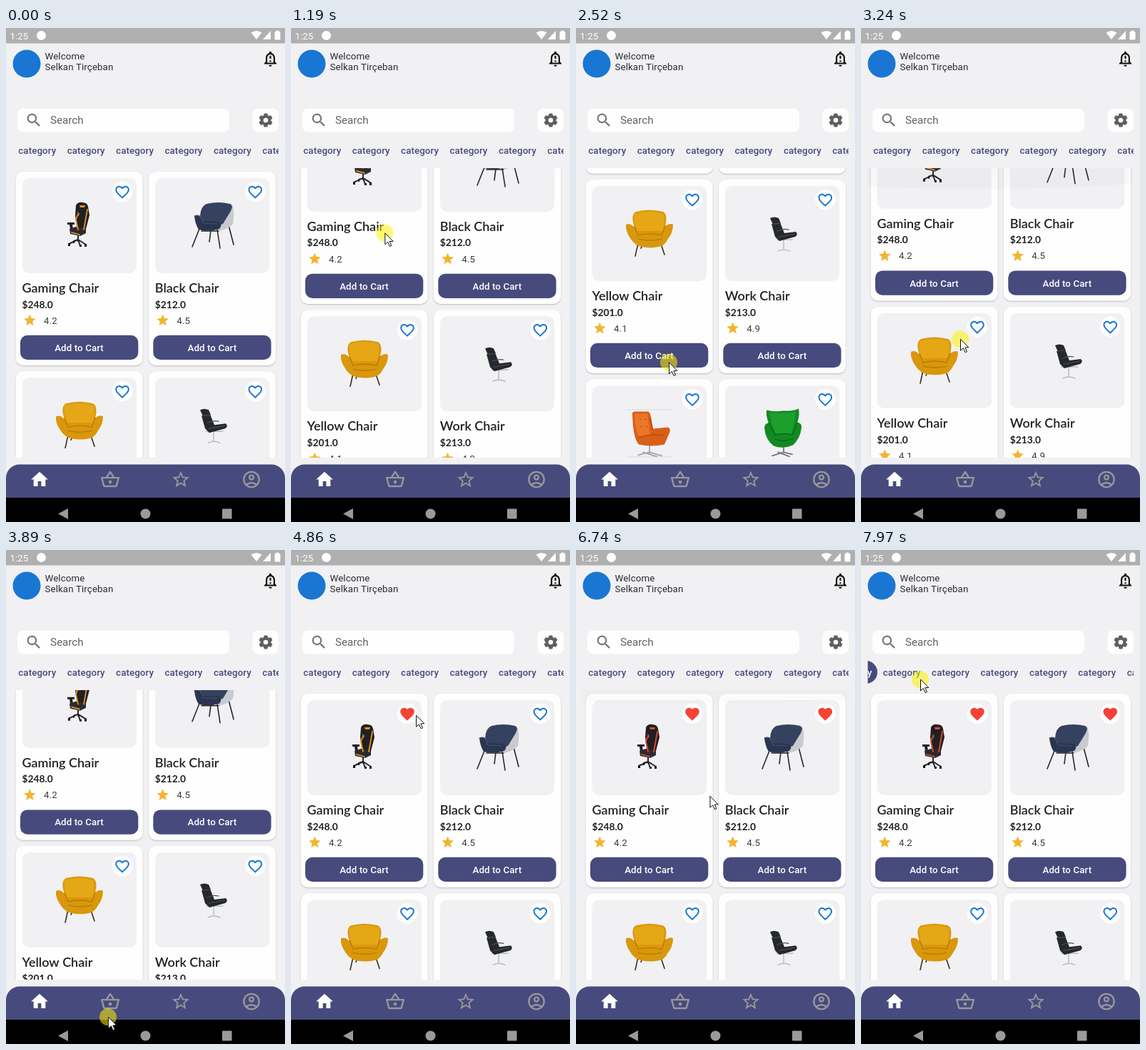
An HTML page with a canvas for the animation above (8000 ms loop, 391 by 691 pixels).

```html
<!DOCTYPE html>
<html lang="en">
<head>
<meta charset="utf-8">
<title>Chair shop</title>
<style>
html, body { margin: 0; width: 100%; height: 100%; overflow: hidden; background: #f1f1f3; }
canvas { display: block; width: 391px; height: 691px; }
</style>
</head>
<body>
<canvas id="stage"></canvas>
<script>
const W = 391, H = 691, LOOP = 8000;
const BG = '#f1f1f3', INDIGO = '#474a7c', WHITE = '#fefefe', BLUE = '#1976d2', RED = '#f44336';
const ROBOTO = 'Roboto, sans-serif', LATO = 'Lato, sans-serif';
const canvas = document.getElementById('stage');
const ctx = canvas.getContext('2d');
const dpr = window.devicePixelRatio || 1;
canvas.width = W * dpr;
canvas.height = H * dpr;

// 24-unit icons
const HEART = 'M12 21.35l-1.45-1.32C5.4 15.36 2 12.28 2 8.5 2 5.42 4.42 3 7.5 3c1.74 0 3.41.81 4.5 2.09C13.09 3.81 14.76 3 16.5 3 19.58 3 22 5.42 22 8.5c0 3.78-3.4 6.86-8.55 11.54z';
const ICONS = {
  home: 'M10 20v-6h4v6h5v-8h3L12 3 2 12h3v8z',
  basket: 'M22 9h-4.79l-4.38-6.56c-.4-.56-1.26-.56-1.66 0L6.79 9H2c-.55 0-1 .45-1 1l2.58 9.54C3.8 20.4 4.58 21 5.5 21h13c.92 0 1.69-.62 1.93-1.46L23 10c0-.55-.45-1-1-1zM12 4.8L14.8 9H9.2zM18.5 19h-13L3.3 11h17.4zM12 13a2 2 0 1 0 0 4 2 2 0 1 0 0-4z',
  starLine: 'M22 9.24l-7.19-.62L12 2 9.19 8.63 2 9.24l5.46 4.73L5.82 21 12 17.27 18.18 21l-1.63-7.03zM12 15.4l-3.76 2.27 1-4.28-3.32-2.88 4.38-.38L12 6.1l1.71 4.04 4.38.38-3.32 2.88 1 4.28z',
  star: 'M12 17.27L18.18 21l-1.64-7.03L22 9.24l-7.19-.61L12 2 9.19 8.63 2 9.24l5.46 4.73L5.82 21z',
  account: 'M12 2a10 10 0 1 0 0 20 10 10 0 1 0 0-20zM7.35 18.5C8.66 17.56 10.26 17 12 17s3.34.56 4.65 1.5a8 8 0 0 1-9.3 0zM18.14 17.12C16.45 15.8 14.32 15 12 15s-4.45.8-6.14 2.12A8 8 0 1 1 18.14 17.12zM12 6a3.5 3.5 0 1 0 0 7 3.5 3.5 0 1 0 0-7zM12 8a1.5 1.5 0 1 1 0 3 1.5 1.5 0 1 1 0-3z',
  search: 'M15.5 14h-.79l-.28-.27A6.5 6.5 0 1 0 13.73 14.43l.27.28v.79l5 4.99L20.49 19zM9.5 14a4.5 4.5 0 1 1 0-9 4.5 4.5 0 1 1 0 9z',
  bell: 'M18 16v-5c0-3.07-1.63-5.64-4.5-6.32V4c0-2-3-2-3 0v.68C7.64 5.36 6 7.92 6 11v5l-2 2v1h16v-1zM16 17H8v-6c0-2.48 1.51-4.5 4-4.5s4 2.02 4 4.5zM11 8h2v4h-2zM11 14h2v2h-2zM12 22a2 2 0 0 0 2-2h-4a2 2 0 0 0 2 2z',
  heart: HEART,
  heartLine: HEART + 'M12 18.65C7.14 14.24 4 11.39 4 8.5 4 6.5 5.5 5 7.5 5c1.54 0 3.04.99 3.57 2.36h1.87C13.46 5.99 14.96 5 16.5 5c2 0 3.5 1.5 3.5 3.5 0 2.89-3.14 5.74-8 10.15z'
};
for (const k in ICONS) ICONS[k] = new Path2D(ICONS[k]);

// Each layer: colour, path, optional stroke width. 'accent' is resolved when drawn.
const PRODUCTS = [
  { name: 'Gaming Chair', price: '$248.0', rate: '4.2', art: [
    ['#26262a', 'M101 289V298M88 302L101 296L112 303M95 298L101 296L104 305', 2],
    ['#202024', 'M86 272H96V275H93L94 281H90L89 275H86ZM98 248Q101 243 107 244Q114 244 115 250L117 262L111 285L100 284L97 262Z'],
    ['#2b2b30', 'M89 281L98 278L112 280L112 287L104 291L90 288Z'],
    ['accent', 'M100 262L98 268L101 282M114 254L109 282M92 286L103 289', 1.8],
    ['accent', 'M103 248H111L110 251H104ZM100 257L103 260L101 264Z'],
    ['#17171a', 'M87 301h3v4h-3zM110 302h3v4h-3zM103 303h3v3h-3zM94 298h2v3h-2z']] },
  { name: 'Black Chair', price: '$212.0', rate: '4.5', art: [
    ['#26272c', 'M271 281L261 306M274 284H298M287 283L285 299M296 282L300 308M312 276L319 303', 1.6],
    ['#c9cad0', 'M300 258L317 247Q321 256 318 274Q312 281 299 284L294 278Z'],
    ['#344260', 'M272 263Q273 249 281 246Q298 242 314 246Q319 248 315 256L304 274L296 277L276 275Z'],
    ['#2a3550', 'M264 263Q271 260 273 266L276 270L298 271Q304 275 299 281Q284 286 270 282Q265 274 264 263Z'],
    ['#43506f', 'M264 263Q272 260 274 267L276 273L296 274', 1.2]] },
  { name: 'Yellow Chair', price: '$201.0', rate: '4.1', art: [
    ['#3a2c20', 'M87 290L83 308M119 291L124 306M93 292L91 297', 1.6],
    ['#d9970c', 'M82 268Q76 250 84 246Q103 241 122 246Q129 250 125 266Q132 261 136 264Q136 275 129 284Q124 294 116 295Q102 298 88 294Q80 290 76 283Q69 273 70 264Q76 261 82 268Z'],
    ['#e5a716', 'M82 249Q103 242 123 249Q125 260 121 273H86Q80 260 82 249Z'],
    ['#b97a08', 'M82 267L87 279Q103 275 120 279L125 266M87 284Q103 288 120 284', 1.3]] },
  { name: 'Work Chair', price: '$213.0', rate: '4.9', art: [
    ['#b7bac0', 'M291 284V299M283 301Q291 297 300 301M281 285H304', 1.4],
    ['#25282d', 'M272 255Q278 252 284 255L287 262L276 264ZM274 263L286 261L292 276L308 274Q312 278 307 281L285 287L279 281Z'],
    ['#4b4f56', 'M282 273Q290 269 298 271M284 281L306 277M276 263L286 262', 1.2]] },
  { name: 'Orange Chair', price: '$220.0', rate: '4.3', art: [
    ['#d2d2d5', 'M72 243.5H133M72 309.5H133', 0.8],
    ['#a5a5aa', 'M103 292V304M87 307L103 303L120 308M94 303L113 309', 1.8],
    ['#d95f16', 'M79 250Q78 246 84 246L101 246Q104 247 105 254L108 270L129 268Q134 270 130 278L124 292Q106 296 88 292Q80 284 79 250Z'],
    ['#eb762a', 'M82 249H100L104 278L88 281Q82 268 82 249Z'],
    ['#b34a0c', 'M88 282Q104 277 122 279M104 254L107 271M90 257h1M97 257h1M91 267h1M99 267h1', 1.2]] },
  { name: 'Green Chair', price: '$215.0', rate: '4.6', art: [
    ['#77787c', 'M291 295V303M275 308L291 303L303 306M283 303L299 309', 1.8],
    ['#128a22', 'M267 244Q278 247 290 245Q302 246 312 242Q314 252 310 261Q317 262 316 269Q314 284 304 293Q290 299 277 294Q265 285 264 268Q265 262 270 262Q266 252 267 244Z'],
    ['#1d9f2e', 'M272 247Q290 250 308 246Q307 260 302 277H280Q272 260 272 247Z'],
    ['#0b6717', 'M270 262L279 279Q291 275 303 279L310 261M279 285Q291 289 304 284', 1.3]] }
];
for (const p of PRODUCTS) for (const layer of p.art) layer[1] = new Path2D(layer[1]);

// Time, pointer x, pointer y
const POINTER = [
  [300, 146, 704], [500, 140, 650], [920, 132, 425], [1060, 132, 388], [1390, 130, 150],
  [1690, 130, 249], [1880, 130, 425], [2120, 130, 225], [2350, 129, 330], [2520, 130, 467],
  [2720, 133, 644], [2810, 135, 672], [3070, 138, 545], [3240, 139, 436], [3430, 140, 262],
  [3600, 141, 430], [3890, 143, 653], [3990, 144, 676], [4410, 150, 325], [4650, 159, 228],
  [4790, 160, 228], [5160, 345, 262], [5290, 374, 250], [5350, 377, 244], [5460, 352, 229],
  [5560, 352, 230], [5860, 287, 473], [6020, 304, 433], [6160, 300, 430], [6350, 285, 330],
  [6600, 240, 440], [6940, 105, 177], [7120, 65, 170], [7380, 65, 171], [7600, 144, 179], [7970, 83, 181]
];
const SCROLL = [
  [970, 0], [1060, 17], [1390, 196], [1600, 223], [1880, 224], [2120, 380], [2350, 390],
  [2520, 269], [2720, 92], [2860, 0], [3110, 0], [3240, 89.5], [3430, 262], [3600, 290],
  [3890, 67], [4000, 0], [6190, 0], [6360, 80], [6570, 0]
];
const CHIPS = [[7620, 0], [7970, 55]];
const PRESSES = [[960, 1410], [1880, 2130], [2360, 2820], [3070, 3440], [3600, 4010],
  [4650, 4770], [5440, 5540], [6160, 6610], [7110, 7330], [7600, 8000]];
const GLOWS = [[2830, 3500], [3990, 4400], [6560, 6800]];

// Monotone cubic through keyframes
function sample(keys, t, c = 1) {
  const n = keys.length - 1;
  if (t <= keys[0][0]) return keys[0][c];
  if (t >= keys[n][0]) return keys[n][c];
  let i = 0;
  while (t >= keys[i + 1][0]) i++;
  const slope = j => (keys[j + 1][c] - keys[j][c]) / (keys[j + 1][0] - keys[j][0]);
  const tangent = j => {
    if (j === 0 || j === n) return 0;
    const a = slope(j - 1), b = slope(j);
    return a * b <= 0 ? 0 : 2 * a * b / (a + b);
  };
  const h = keys[i + 1][0] - keys[i][0], u = (t - keys[i][0]) / h, v = 1 - u;
  return keys[i][c] * v * v * (1 + 2 * u) + keys[i + 1][c] * u * u * (3 - 2 * u)
    + h * u * v * (v * tangent(i) - u * tangent(i + 1));
}

function box(x, y, w, h, r, color) {
  ctx.fillStyle = color;
  ctx.beginPath();
  ctx.roundRect(x, y, w, h, r);
  ctx.fill();
}

function disc(x, y, r, color) {
  ctx.fillStyle = color;
  ctx.beginPath();
  ctx.arc(x, y, r, 0, Math.PI * 2);
  ctx.fill();
}

function poly(color, ...pts) {
  ctx.fillStyle = color;
  ctx.beginPath();
  for (let i = 0; i < pts.length; i += 2) ctx.lineTo(pts[i], pts[i + 1]);
  ctx.closePath();
  ctx.fill();
}

function text(str, x, y, font, color, align = 'left', spacing = 0) {
  ctx.font = font;
  ctx.fillStyle = color;
  ctx.textAlign = align;
  ctx.letterSpacing = spacing + 'px';
  ctx.fillText(str, x, y);
}

function icon(name, x, y, size, color) {
  ctx.save();
  ctx.translate(x - size / 2, y - size / 2);
  ctx.scale(size / 24, size / 24);
  ctx.fillStyle = color;
  ctx.fill(ICONS[name], 'evenodd');
  ctx.restore();
}

function gear(x, y) {
  ctx.save();
  ctx.translate(x, y);
  for (let i = 0; i < 6; i++) {
    poly('#5f5f62', -3.4, -6, -2.2, -9.6, 2.2, -9.6, 3.4, -6);
    ctx.rotate(Math.PI / 3);
  }
  disc(0, 0, 7.2, '#5f5f62');
  disc(0, 0, 3.3, WHITE);
  ctx.restore();
}

function statusBar() {
  box(0, 0, W, 21.5, 0, '#b0b0b0');
  text('1:25', 5.5, 15.5, '13.3px ' + ROBOTO, WHITE);
  disc(49.5, 10.5, 6.5, WHITE);
  ctx.fillStyle = WHITE;
  ctx.beginPath();
  ctx.moveTo(351, 16);
  ctx.lineTo(343.5, 6.5);
  ctx.quadraticCurveTo(351, 1.5, 358.5, 6.5);
  ctx.fill();
  poly(WHITE, 360, 16, 371, 16, 371, 4);
  box(376.5, 5, 8, 11.5, 1, WHITE);
  box(378.5, 3.5, 4, 2, 0, WHITE);
}

function header() {
  disc(29, 50, 19.5, BLUE);
  text('Welcome', 54.5, 43.5, '13.3px ' + ROBOTO, '#2c2c2e', 'left', 0.1);
  text('Selkan Tirçeban', 54.5, 59, '13.3px ' + ROBOTO, '#2c2c2e', 'left', 0.1);
  icon('bell', 370.5, 43, 26, '#111');
  box(16, 112.5, 297, 33, 8, WHITE);
  icon('search', 39, 129, 25, '#757578');
  text('Search', 62, 133.5, '15.2px ' + ROBOTO, '#626265');
  box(345.5, 112.5, 36.5, 33, 8, WHITE);
  gear(364, 129);
}

function categories(t) {
  const shift = sample(CHIPS, t);
  ctx.save();
  ctx.beginPath();
  ctx.rect(9.5, 150, 372.5, 45);
  ctx.clip();
  for (let i = 0; i < 7; i++) {
    const x = 17.3 + i * 68.4 - shift;
    const picked = i === 0 && t >= 7370;
    if (picked) box(x - 7.5, 155, 68.2, 32, 16, INDIGO);
    text('category', x, 175.7, '500 13.3px ' + ROBOTO, picked ? WHITE : INDIGO, 'left', 0.1);
  }
  ctx.restore();
}

function chair(layers, accent) {
  ctx.lineCap = ctx.lineJoin = 'round';
  for (const [color, path, width] of layers) {
    ctx.fillStyle = ctx.strokeStyle = color === 'accent' ? accent : color;
    ctx.lineWidth = width || 1;
    if (width) ctx.stroke(path); else ctx.fill(path);
  }
}

function card(i, liked, accent) {
  const p = PRODUCTS[i], x = i % 2 * 186.3;
  ctx.save();
  ctx.translate(0, Math.floor(i / 2) * 279.3);
  ctx.save();
  ctx.shadowColor = 'rgba(0,0,0,.22)';
  ctx.shadowBlur = 2 * dpr;
  ctx.shadowOffsetY = dpr;
  box(x + 13.7, 201, 178, 271, 10, WHITE);
  ctx.restore();
  box(x + 22.6, 210, 160.4, 133, 10, BG);
  chair(p.art, accent);
  disc(x + 163, 229, 14.2, WHITE);
  icon(liked ? 'heart' : 'heartLine', x + 163, 229.5, 23.5, liked ? RED : BLUE);
  text(p.name, x + 22.5, 370, '600 18px ' + LATO, '#202022');
  text(p.price, x + 22.5, 391.5, '700 13.8px ' + LATO, '#202022');
  icon('star', x + 33.3, 408.8, 20, '#f3b52f');
  text(p.rate, x + 53, 413.7, '13.3px ' + ROBOTO, '#3c3c3f', 'left', 0.1);
  box(x + 20, 429.7, 165.3, 34.3, 10, INDIGO);
  text('Add to Cart', x + 102.5, 451.8, '500 13.3px ' + ROBOTO, WHITE, 'center', 0.1);
  ctx.restore();
}

function glow(t) {
  for (const [a, b] of GLOWS) {
    if (t < a || t > b) continue;
    const k = Math.sin(Math.PI * Math.sqrt((t - a) / (b - a)));
    ctx.fillStyle = `rgba(110,110,130,${0.06 * k})`;
    ctx.beginPath();
    ctx.ellipse(160, 196, 330, 46 * k, 0, 0, Math.PI);
    ctx.fill();
  }
}

function products(t) {
  const scroll = sample(SCROLL, t);
  const accent = t < 6200 ? '#e8921c' : '#e5482c';
  ctx.save();
  ctx.beginPath();
  ctx.rect(9, 196, 373, 405);
  ctx.clip();
  ctx.save();
  ctx.translate(0, -scroll);
  PRODUCTS.forEach((p, i) => card(i, i === 0 && t >= 4760 || i === 1 && t >= 5530, accent));
  ctx.restore();
  glow(t);
  ctx.restore();
}

function navigation() {
  box(0, 610.5, W, 50, [19, 19, 0, 0], INDIGO);
  icon('home', 47, 631.5, 28.5, WHITE);
  ['basket', 'starLine', 'account'].forEach((name, i) =>
    icon(name, 146 + i * 99, 631.5, 28.5, '#98979c'));
  box(0, 657, W, 34, 0, '#000');
  poly('#9a9a9a', 73, 679.5, 87, 672, 87, 687);
  disc(195.5, 679.5, 7, '#9a9a9a');
  box(303, 672.5, 13.5, 14, 1, '#9a9a9a');
}

function pointer(t) {
  if (t < 300) return;
  const x = sample(POINTER, t, 1), y = sample(POINTER, t, 2);
  if (PRESSES.some(([a, b]) => t >= a && t < b)) disc(x, y, 12, 'rgba(255,240,0,.55)');
  ctx.save();
  ctx.translate(x + 0.5, y);
  poly(WHITE, 0, 0, 0, 16, 3.8, 12.5, 6.6, 18.5, 9, 17.5, 6.3, 11.7, 11.3, 11.5);
  ctx.strokeStyle = '#111';
  ctx.lineWidth = 1;
  ctx.lineJoin = 'miter';
  ctx.stroke();
  ctx.restore();
}

function draw(t) {
  ctx.setTransform(dpr, 0, 0, dpr, 0, 0);
  box(0, 0, W, H, 0, BG);
  statusBar();
  header();
  categories(t);
  products(t);
  navigation();
  pointer(t);
}

const start = performance.now();
function tick() {
  draw((performance.now() - start) % LOOP);
  requestAnimationFrame(tick);
}
tick();
</script>
</body>
</html>
```
